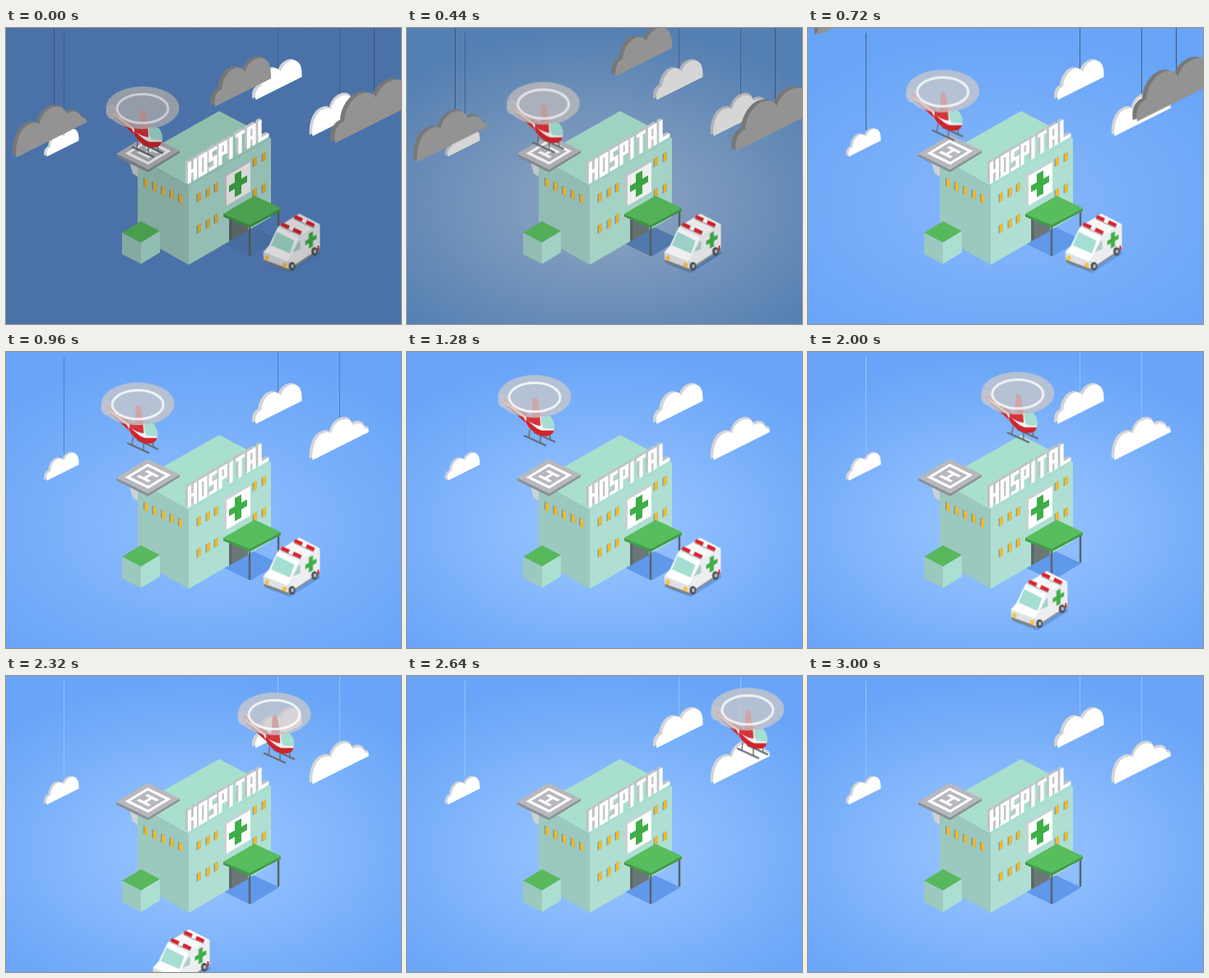
An HTML page for the animation above (3.04 s loop, 480 by 360 pixels).

```html
<!DOCTYPE html>
<html lang="en">
<head>
<meta charset="utf-8">
<title>Hospital</title>
<style>
html, body { margin: 0; width: 100%; height: 100%; overflow: hidden; background: #69a4f6; }
svg { display: block; width: 480px; height: 360px; }

.core, .edge, .strings, .white, .lit, .shade, .dark, .van, .fly-x, .fly-y {
  animation: 3.04s linear infinite;
}
.core { animation-name: core; }
.edge { animation-name: edge; }
.strings { animation-name: strings; stroke-width: 1; fill: none; }
.white { animation-name: white; }
.lit { animation-name: lit; }
.shade { animation-name: shade; }
.dark.top { animation-name: rise-top; }
.dark.left { animation-name: rise-left; }
.dark.right { animation-name: rise-right; }
.van { animation-name: drive; }
.fly-x { animation-name: fly-x; }
.fly-y { animation-name: fly-y; }

/* night turning into day */
@keyframes core {
  0% { stop-color: #4a72a8; }
  14.47% { stop-color: #829dbe; }
  23.68% { stop-color: #80b3fb; }
  42.1%, 100% { stop-color: #90bffe; }
}
@keyframes edge {
  0% { stop-color: #4a72a8; }
  14.47% { stop-color: #547fb2; }
  23.68%, 100% { stop-color: #68a4f7; }
}
@keyframes strings {
  0% { stroke: #405f8c; }
  23.68% { stroke: #46608c; }
  42.1% { stroke: #6ca7f7; }
  55.26%, 100% { stroke: #97c0f8; }
}
@keyframes white {
  0% { filter: brightness(1); }
  14.47% { filter: brightness(.84); }
  23.68%, 100% { filter: brightness(1); }
}
@keyframes lit {
  0% { filter: brightness(.85); }
  14.47% { filter: brightness(.94); }
  23.68%, 100% { filter: brightness(1); }
}
@keyframes shade {
  0% { fill: #486c9e; }
  14.47% { fill: #5279ae; }
  23.68%, 100% { fill: #6098ea; }
}

/* storm clouds dip, then are pulled up */
@keyframes rise-top {
  0% { transform: none; animation-timing-function: cubic-bezier(.333, 0, .667, -.567); }
  17.76%, 100% { transform: translateY(-110px); }
}
@keyframes rise-left {
  0% { transform: none; animation-timing-function: cubic-bezier(.333, 0, .667, -.567); }
  24.34%, 100% { transform: translateY(-168px); }
}
@keyframes rise-right {
  0%, 9.87% { transform: none; animation-timing-function: cubic-bezier(.333, 0, .667, -.567); }
  28.49%, 100% { transform: translateY(-155px); }
}

@keyframes drive {
  0%, 40.92% { transform: none; animation-timing-function: cubic-bezier(.333, 0, .667, .333); }
  100% { transform: translate(-373px, 229px); }
}
@keyframes fly-x {
  0%, 6.58% { transform: translateX(166px); animation-timing-function: cubic-bezier(.7, 0, .8, 1); }
  42.1% { transform: translateX(155px); animation-timing-function: cubic-bezier(.333, .12, .667, .453); }
  100% { transform: translateX(546.7px); }
}
@keyframes fly-y {
  0%, 6.58% { transform: translateY(97px); animation-timing-function: cubic-bezier(.333, 0, .667, 1); }
  42.1% { transform: translateY(54px); animation-timing-function: cubic-bezier(.333, 0, .667, .333); }
  100% { transform: translateY(31px); }
}
</style>
</head>
<body>
<svg viewBox="0 0 480 360">
  <defs>
    <radialGradient id="sky" gradientUnits="userSpaceOnUse" cx="0" cy="0" r="330"
      gradientTransform="translate(238 212) scale(1 .64)">
      <stop class="core" offset=".25"/>
      <stop class="edge" offset="1"/>
    </radialGradient>

    <path id="humpA" d="M0 0C-2-22 6-38 18-37C26-37 31-33 33-30C35-42 46-47 56-43C64-40 69-34 71-26C80-27 90-20 93-9C97-8 100-4 100 0Z"/>
    <path id="humpB" d="M0 0C-3-14 2-24 12-23C13-40 24-50 36-48C45-46 51-40 54-33C57-44 68-48 80-44C94-38 101-24 100 0Z"/>

    <g id="winL"><path d="M-2.5-6.2V3.8L2.5 6.2V-3.8Z" fill="#7f9a92"/><path d="M-1-5.5V4.5L2.5 6.2V-3.8Z" fill="#f9b826"/></g>
    <g id="winR"><path d="M-2.5-3.6V6.4L2.5 3.6V-6.4Z" fill="#8aa39a"/><path d="M-1-4.4V5.5L2.5 3.6V-6.4Z" fill="#f9b826"/></g>

    <g id="word" fill="none" stroke-width="4.2">
      <path d="M2 0V-26M9 0V-26M2-13H9"/>
      <path transform="translate(13)" d="M2-2V-24H8.500V-2Z"/>
      <path transform="translate(25.5)" d="M10-24H2V-13H8V-2H0"/>
      <path transform="translate(37.5)" d="M2 0V-24H8.500V-12H2"/>
      <path transform="translate(47.5)" d="M5 0V-26"/>
      <path transform="translate(58)" d="M5.500 0V-26M0-24H11"/>
      <path transform="translate(72)" d="M2 0V-24H8.500V0M2-11H8.500"/>
      <path transform="translate(85.5)" d="M2-26V-2H13"/>
    </g>
    <g id="sign"><use href="#word" transform="matrix(1 -.59 0 1 221 190)"/></g>
    <path id="plus" d="M-4-14H4V-4H11V4H4V14H-4V4H-11V-4H-4Z" fill="#3fae49"/>
  </defs>

  <rect width="480" height="360" fill="url(#sky)"/>

  <!-- fair-weather clouds -->
  <path class="strings" d="M70.5 6V124M330.5 0V50M405.5 0V82"/>
  <g class="white">
    <g fill="#d2d4d8">
      <use href="#humpB" transform="matrix(.4 -.2 0 .41 46.5 155.5)"/>
      <use href="#humpB" transform="matrix(.57 -.285 0 .58 299.5 86)"/>
      <use href="#humpA" transform="matrix(.72 -.36 0 .72 369 130)"/>
    </g>
    <g fill="#fff">
      <use href="#humpB" transform="matrix(.39 -.195 0 .41 49.5 156.5)"/>
      <use href="#humpB" transform="matrix(.56 -.28 0 .58 303.5 87.5)"/>
      <use href="#humpA" transform="matrix(.685 -.343 0 .71 372.5 131.5)"/>
    </g>
  </g>

  <!-- storm clouds -->
  <g class="dark top">
    <use href="#humpB" transform="matrix(.7 -.35 0 .72 249 94)" fill="#777876"/>
    <use href="#humpB" transform="matrix(.68 -.34 0 .72 254 95.5)" fill="#929392"/>
  </g>
  <g class="dark left">
    <path d="M58.5-200V95" stroke="#44546b"/>
    <use href="#humpA" transform="matrix(.88 -.44 0 .88 8 156)" fill="#777876"/>
    <use href="#humpA" transform="matrix(.86 -.43 0 .88 12.5 157.5)" fill="#929392"/>
  </g>
  <g class="dark right">
    <path d="M447.5-200V80" stroke="#44546b"/>
    <use href="#humpB" transform="matrix(.92 -.46 0 .92 395 138.5)" fill="#777876"/>
    <use href="#humpB" transform="matrix(.92 -.46 0 .92 400 140)" fill="#929392"/>
  </g>

  <!-- hospital -->
  <path class="shade" d="M264 262L300 242L332 257L297 278Z"/>
  <g class="lit">
    <path d="M160 157L259 101L322 134L222 192Z" fill="#a9dfcd"/>
    <path d="M160 157L222 192V288L160 253Z" fill="#9bc8bf"/>
    <path d="M222 192L322 134V230L222 288Z" fill="#aedfd2"/>

    <use href="#winL" x="169.5" y="188"/>
    <use href="#winL" x="180" y="193"/>
    <use href="#winL" x="190.5" y="198"/>
    <use href="#winL" x="201" y="202.5"/>
    <use href="#winL" x="211.5" y="207.5"/>
    <use href="#winR" x="234" y="206"/>
    <use href="#winR" x="245" y="200"/>
    <use href="#winR" x="255" y="194"/>
    <use href="#winR" x="302" y="163"/>
    <use href="#winR" x="313" y="157"/>
    <use href="#winR" x="234" y="244"/>
    <use href="#winR" x="245" y="238"/>
    <use href="#winR" x="255" y="232"/>
    <use href="#winR" x="302" y="201"/>
    <use href="#winR" x="313" y="195"/>

    <path d="M265 179L294 162L297 163V199L268 216L265 214Z" fill="#ccd0d3"/>
    <path d="M268 180L297 163V199L268 216Z" fill="#fff"/>
    <use href="#plus" transform="matrix(1 -.57 0 1 282 189.5)"/>

    <path d="M141 249L164 235L187 247L164 261Z" fill="#58b95c"/>
    <path d="M141 249L164 261V287L141 275Z" fill="#9bc8bf"/>
    <path d="M164 261L187 247V273L164 287Z" fill="#abdfd1"/>

    <path d="M271 230L294 238V247L271 260Z" fill="#697777"/>
    <path d="M296 238V277M331 221V256M273 230V258" stroke="#59656a" stroke-width="2.5"/>
    <path d="M264 226L296 239L334 219V222.500L296 243L264 229.500Z" fill="#439c4a"/>
    <path d="M264 226L302 204L334 219L296 239.500Z" fill="#58bd5d"/>

    <!-- helipad -->
    <path d="M150 163L160 169V181L154 177Z" fill="#cdd3d6"/>
    <path d="M134 153L172.500 172L211 149V152L172.500 175.500L134 156.500Z" fill="#8c9096"/>
    <g transform="matrix(19.5 9.5 19 -11.5 172.5 151)">
      <rect x="-1" y="-1" width="2" height="2" fill="#b6b8bd"/>
      <rect x="-.64" y="-.64" width="1.28" height="1.28" fill="none" stroke="#fff" stroke-width=".17"/>
      <path d="M-.36-.26H.36M-.36 .26H.36M0-.26V.26" fill="none" stroke="#fff" stroke-width=".17"/>
    </g>
  </g>

  <g role="img" aria-label="HOSPITAL">
    <g stroke="#bfc2c7">
      <use href="#sign" x="-3" y="-1.700"/>
      <use href="#sign" x="-2" y="-1.100"/>
      <use href="#sign" x="-1" y="-.600"/>
    </g>
    <use href="#sign" stroke="#fff"/>
  </g>

  <!-- ambulance -->
  <g class="van">
    <path class="shade" d="M316 287L345 298L383 274L378 269L340 285Z"/>
    <g class="lit" transform="translate(-.5 .7)">
      <path d="M357 254L382 238V268L344 293V280L347 274Z" fill="#edeef0"/>
      <path d="M331 241L357 225L382 238L357 254Z" fill="#f8f8f8"/>
      <path d="M331 241L357 254L346 277L320 264Z" fill="#fff"/>
      <path d="M329.500 247L351 258L345.500 273.500L322.500 263.500Z" fill="#a5ded3"/>
      <path d="M320 264L346 276L343 284L313 272Z" fill="#fff"/>
      <path d="M313 272L344 284V294L314 283Z" fill="#dfe1e4"/>
      <path d="M314 281L344 292V295L314 284.500Z" fill="#7d8288"/>
      <path d="M349 272L356 259L358 258V268Z" fill="#a9cfc9"/>
      <path d="M344 292L382 267V269.500L344 295Z" fill="#8b9095"/>
      <g fill="#4d5257">
        <ellipse cx="348" cy="289" rx="4" ry="5.200"/>
        <ellipse cx="375.500" cy="271" rx="4" ry="5.200"/>
      </g>
      <g fill="#c3c6c9">
        <ellipse cx="348.500" cy="289" rx="1.700" ry="2.400"/>
        <ellipse cx="376" cy="271" rx="1.700" ry="2.400"/>
      </g>
      <g fill="#f8c13a">
        <ellipse cx="317.500" cy="279" rx="2.500" ry="3"/>
        <ellipse cx="339" cy="287.500" rx="2.500" ry="3"/>
      </g>
      <path d="M380 264V269" stroke="#d8242f" stroke-width="2"/>
      <path d="M335 239L359 250M351 230L375 241" stroke="#a9adb2" stroke-width="4.500"/>
      <path d="M335 237.500L359 248.500M351 228.500L375 239.500" stroke="#fff" stroke-width="4.500"/>
      <path d="M335 237.500L359 248.500M351 228.500L375 239.500" stroke="#d8242f" stroke-width="4.500" stroke-dasharray="10.500 5.400"/>
      <use href="#plus" transform="matrix(.62 -.36 0 .65 371 257)"/>
    </g>
  </g>

  <!-- helicopter -->
  <g class="fly-x"><g class="fly-y"><g class="lit">
    <path d="M-37 2L-9 21L2 30L-10 33L-38 8Z" fill="#d02a2f"/>
    <path d="M-36 7L-12 25L-9 32" fill="none" stroke="#f1f1f1" stroke-width="2.500"/>
    <ellipse cx="-38" cy="5" rx="6" ry="8" fill="#c9c9c9" fill-opacity=".5" stroke="#dedede" stroke-opacity=".7"/>
    <path d="M-4 28L-2 2H3L8 27Z" fill="#d8363a"/>
    <g transform="translate(2 1)" fill="none" stroke="#666d75" stroke-width="2.300" stroke-linecap="round">
      <path d="M-14 47L11 58.500M-2 43L22 54"/>
      <path d="M-8 40L-9 49M5 46L5 55M4 40L5 46M16 42L17 52" stroke-width="1.500"/>
    </g>
    <g transform="translate(2.500 2.500) scale(.95)">
      <path d="M-14 28C-9 21 8 19 18 24C23 30 24 40 20 45C15 50 5 49-2 44C-8 40-13 35-14 28Z" fill="#cf242b"/>
      <path d="M-13 27C-7 32-2 38 6 41L22 41C24 34 21 27 17 23L2 22Z" fill="#f3f3f3"/>
      <path d="M-13 27C-7 21-2 21 4 22L5 35C-3 34-8 31-13 27Z" fill="#d5333a"/>
      <path d="M6 24C12 21 17 22 19 25C23 31 23 36 22 39L9 38C6 34 5 28 6 24Z" fill="#a5ded2"/>
    </g>
    <ellipse rx="44.500" ry="26" fill="#cbc8c8" fill-opacity=".76"/>
    <ellipse cy="1" rx="31" ry="17.500" fill="none" stroke="#fff" stroke-opacity=".8" stroke-width="3"/>
  </g></g></g>
</svg>
</body>
</html>
```
